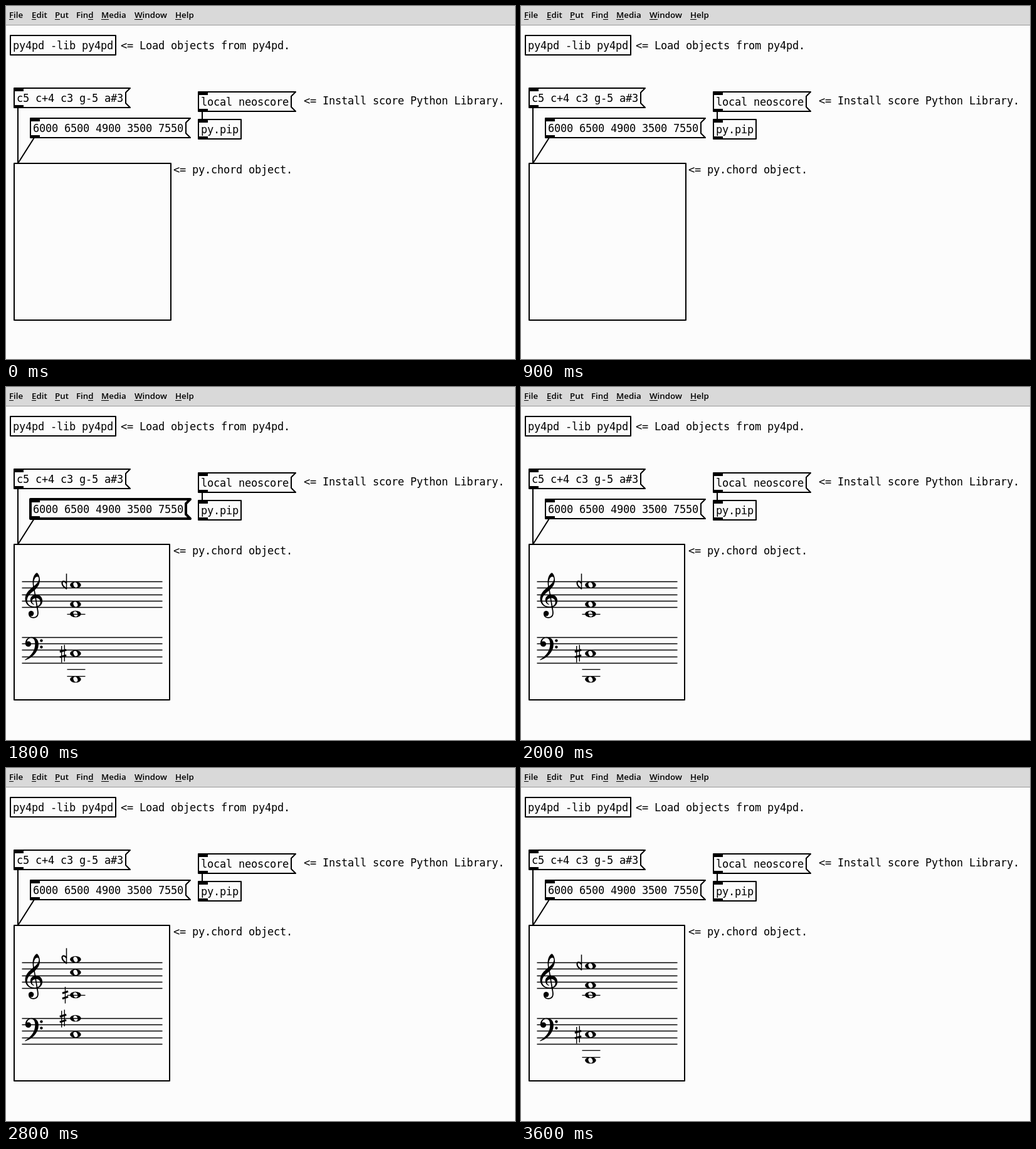
Write an HTML page with a canvas that moves like this. It is 812 px wide and 563 px high and loops after 5.1 s.

```html
<!DOCTYPE html>
<html lang="en">
<head>
<meta charset="utf-8">
<title>Chord patch</title>
<style>
html, body { margin: 0; width: 100%; height: 100%; overflow: hidden; background: #fcfcfc; }
canvas { display: block; }
</style>
</head>
<body>
<canvas id="stage" width="812" height="563"></canvas>
<script>
const ctx = document.getElementById('stage').getContext('2d');
const LOOP = 5100;
const INK = '#000', PAPER = '#fcfcfc', BAR = '#d9d9d9', EDGE = '#999';
const MONO = '17px "DejaVu Sans Mono", monospace';
const MENU_FONT = '600 13.33px "Open Sans", "Noto Sans", sans-serif';
const CELL = 10;          // width of one monospace cell
const GAP = 10.3;         // distance between staff lines
const TREBLE = 310, BASS = 398.8;

// Menu label, x, index of the underlined letter
const MENU = [['File', 5, 0], ['Edit', 41, 0], ['Put', 78, 0], ['Find', 112, 3],
  ['Media', 152, 0], ['Window', 205, 0], ['Help', 270, 0]];

// Notes count staff gaps down from the top line
const CHORD_A = {
  treble: [-0.5, 1.5, 5], bass: [0, 2.5],
  ledgers: [TREBLE + 5 * GAP],
  marks() { halfFlat(-0.5); sharp(94, TREBLE + 5 * GAP, true); sharp(90.5, BASS); }
};
const CHORD_B = {
  treble: [0.5, 3.5, 5], bass: [2.5, 6.5],
  ledgers: [TREBLE + 5 * GAP, BASS + 5 * GAP, BASS + 6 * GAP],
  marks() { halfFlat(0.5); sharp(90.5, BASS + 2.5 * GAP); }
};

// Start time, chord on show, message being clicked
const STEPS = [
  [0, null, ''], [800, null, 'names'], [900, null, ''], [1300, CHORD_A, ''],
  [1800, CHORD_B, 'cents'], [1900, CHORD_B, ''],
  [2600, CHORD_A, 'names'], [2700, CHORD_A, ''],
  [3500, CHORD_B, 'cents'], [3600, CHORD_B, '']
];

const clefBody = new Path2D(
  'M376 415l25-145 29-18c147 0 241-113 241-241c0-160-120-263-307-263' +
  'c-245 0-364 165-364 339c0 202 153 345 297 464l9 24c-7 41-14 106-14 164' +
  'c0 104 24 229 98 311c20 22 51 48 65 48c11 0 37-28 52-50' +
  'c41-60 65-146 65-233c0-153-82-280-190-381z');
const clefHoles = [
  'M470 943c-61 0-133-96-133-252c0-32 2-66 6-92l13-8c79 69 174 159 174 270c0 55-27 82-60 82z',
  'M361 262l-21 128-14 4c-47-38-93-75-153-142c-83-94-93-173-93-232c0-139 113-236 288-236' +
  'c20 0 40 2 56 5l14 14-50 298-20 8c-61-17-100-60-100-117c0-46 30-89 72-107l3-24' +
  'c-7 0-19 3-27 6c-68 23-115 87-115 177c0 85 57 164 145 194z',
  'M430 103l49-285 16-6c56 28 94 79 94 142c0 88-67 156-148 163z'
];
clefHoles.forEach(d => clefBody.addPath(new Path2D(d)));
const clefHook = new Path2D('M469-248C480-330 497-400 497-457C497-600 400-640 322-640C225-640 160-590 154-500');
const bassBody = new Path2D(
  'M0-635C250-560 520-340 520-10C520 160 410 262 250 262C110 262 8 160 8 20' +
  'C8-60 55-112 125-112C185-112 232-70 232-8C232 55 185 98 130 98' +
  'C105 98 90 90 75 85C85 160 150 225 235 225C345 225 385 120 385 0C385-270 250-450-5-612Z');

function lines(points, width = 2, close = false) {
  ctx.lineWidth = width;
  ctx.beginPath();
  points.forEach(([x, y]) => ctx.lineTo(x, y));
  if (close) ctx.closePath();
  ctx.stroke();
}

function disc(x, y, r) {
  ctx.beginPath();
  ctx.arc(x, y, r, 0, 7);
  ctx.fill();
}

function mono(text, x, y) {
  ctx.font = MONO;
  ctx.letterSpacing = (CELL - 17 * 0.602).toFixed(3) + 'px';
  ctx.fillText(text, x, y);
  ctx.letterSpacing = '0px';
}

function ports(x, y) {
  ctx.fillRect(x, y, 15, 5);
  ctx.fillRect(x, y + 27, 15, 5);
}

function objectBox(text, x, y, hasPorts) {
  const right = x + text.length * CELL + 8;
  lines([[x, y], [right, y], [right, y + 31], [x, y + 31]], 2, true);
  if (hasPorts) ports(x, y);
  mono(text, x + 4, y + 22);
}

function messageBox(text, x, y, active) {
  const notch = x + text.length * CELL + 8, tip = notch + 7;
  lines([[x, y], [tip, y], [notch, y + 7], [notch, y + 24], [tip, y + 31], [x, y + 31]],
    active ? 4 : 2, true);
  ports(x, y);
  mono(text, x + 4, y + 22);
}

function menuBar() {
  ctx.fillStyle = BAR;
  ctx.fillRect(0, 0, 812, 30);
  ctx.fillStyle = EDGE;
  ctx.fillRect(0, 30, 812, 1);
  ctx.fillStyle = INK;
  ctx.font = MENU_FONT;
  for (const [label, x, key] of MENU) {
    ctx.fillText(label, x, 19);
    const start = ctx.measureText(label.slice(0, key)).width;
    const width = ctx.measureText(label[key]).width;
    ctx.fillRect(Math.round(x + start), 21, Math.round(width), 1);
  }
}

function inStaffUnits(x, y, draw) {
  ctx.save();
  ctx.translate(x, y);
  ctx.scale(GAP / 250, -GAP / 250);
  draw();
  ctx.restore();
}

function clefs() {
  inStaffUnits(30, TREBLE + 3 * GAP, () => {
    ctx.fill(clefBody, 'evenodd');
    ctx.lineWidth = 43;
    ctx.stroke(clefHook);
    disc(234, -482, 102);
  });
  inStaffUnits(30, BASS + GAP, () => {
    ctx.fill(bassBody);
    disc(630, 125, 54);
    disc(630, -125, 54);
  });
}

function wholeNote(y) {
  ctx.beginPath();
  ctx.ellipse(110.4, y, 8.8, 5.3, 0, 0, 2 * Math.PI);
  ctx.closePath();
  ctx.moveTo(113.4, y);
  ctx.ellipse(110.4, y, 3.2, 4.4, -0.4, 0, 2 * Math.PI);
  ctx.fill('evenodd');
}

function sharp(x, y, half) {
  for (const dx of half ? [0] : [-2.3, 2.3]) {
    lines([[x + dx, y - 13 - dx * 0.4], [x + dx, y + 13.5 - dx * 0.4]], 1.4);
  }
  const reach = half ? 4.6 : 5.2;
  for (const dy of [-4.3, 4.3]) {
    lines([[x - reach, y + dy + 1.5], [x + reach, y + dy - 1.5]], 3);
  }
}

function halfFlat(step) {
  const y = TREBLE + step * GAP;
  lines([[96, y - 18], [96, y + 7]], 1.5);
  ctx.lineWidth = 2.2;
  ctx.beginPath();
  ctx.moveTo(96, y + 6);
  ctx.bezierCurveTo(91, y + 3, 89, y + 1, 89, y - 3);
  ctx.bezierCurveTo(89, y - 7, 93.5, y - 6.5, 96, y - 2.5);
  ctx.stroke();
}

// Horizontal rule snapped to a pixel row
function rule(x1, x2, y) {
  lines([[x1, Math.round(y)], [x2, Math.round(y)]], 1.3);
}

function score(chord) {
  ctx.save();
  ctx.translate(0.5, 0.5);
  for (const top of [TREBLE, BASS]) {
    for (let i = 0; i < 5; i++) rule(25, 249, top + i * GAP);
  }
  clefs();
  chord.ledgers.forEach(y => rule(97, 126, y));
  chord.treble.forEach(n => wholeNote(TREBLE + n * GAP));
  chord.bass.forEach(n => wholeNote(BASS + n * GAP));
  chord.marks();
  ctx.restore();
}

function render(time) {
  const [, chord, clicked] = STEPS.findLast(step => step[0] <= time);
  ctx.fillStyle = PAPER;
  ctx.fillRect(0, 0, 812, 563);
  ctx.strokeStyle = INK;
  ctx.lineJoin = 'round';
  menuBar();

  objectBox('py4pd -lib py4pd', 7, 47);
  messageBox('c5 c+4 c3 g-5 a#3', 13, 131, clicked === 'names');
  messageBox('6000 6500 4900 3500 7550', 39, 179, clicked === 'cents');
  messageBox('local neoscore', 307, 137);
  objectBox('py.pip', 307, 181, true);
  mono('<= Load objects from py4pd.', 183, 69);
  mono('<= Install score Python Library.', 475, 157);
  mono('<= py.chord object.', 267, 267);

  lines([[19, 162], [19, 251]]);
  lines([[45, 210], [19, 251]]);
  lines([[313, 168], [313, 181]]);

  const size = chord ? 248 : 250;
  ctx.strokeRect(13, 251, size, size);
  if (chord) score(chord);
}

const begin = performance.now();
function tick() {
  render((performance.now() - begin) % LOOP);
  requestAnimationFrame(tick);
}
tick();
</script>
</body>
</html>
```
